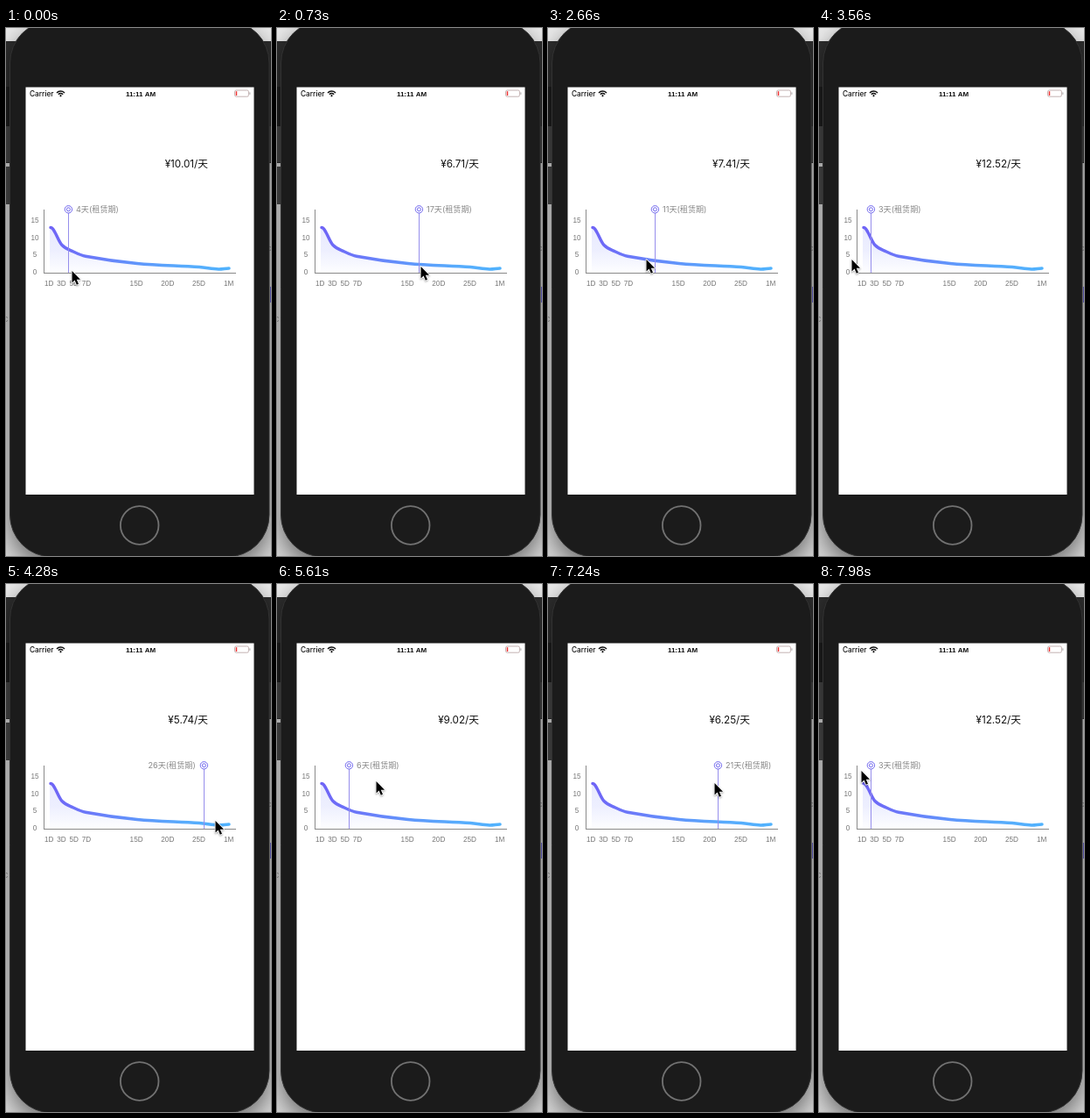
An HTML page with a canvas that plays this animation: 303x602 px, repeating every 8 s.

```html
<!DOCTYPE html>
<html lang="zh-CN">
<head>
<meta charset="utf-8">
<title>Rental price chart</title>
<style>
html, body { margin: 0; width: 100%; height: 100%; overflow: hidden; background: #c6c6c6; }
canvas { display: block; width: 303px; height: 602px; }
</style>
</head>
<body>
<canvas id="stage"></canvas>
<script>
const W = 303, H = 602, LOOP = 8000, STEP = 147.8;
const UI = 'Inter, "Noto Sans CJK SC", "Noto Sans CJK", sans-serif';
const SANS = '"Liberation Sans", Arial, sans-serif';
const canvas = document.getElementById('stage');
const dpr = window.devicePixelRatio || 1;
canvas.width = W * dpr;
canvas.height = H * dpr;
const ctx = canvas.getContext('2d');

// Eased sweeps of the marker and the hand: begin step, end step, goal
const MARKER = { from: [71], sweeps: [
  [0, 10, 253], [13, 21.36, 50], [23, 30.74, 252], [32, 36, 82],
  [38, 42, 221], [44, 46, 228], [47, 54, 59]] };
const HAND = { from: [75, 276], sweeps: [
  [0, 10, 252, 265], [13, 22.15, 6, 262], [22.2, 30.5, 261, 270], [32, 36, 84, 230],
  [37, 38, 113, 224], [38, 44, 225, 230], [47, 54, 48, 212]] };

// Known daily prices; days between them are interpolated
const PRICES = [[1, 15], [3, 12.52], [4, 10.01], [6, 9.02], [11, 7.41],
  [25, 5.78], [26, 5.74], [29, 5.57]];
const CURVE = [[51, 227.5], [64, 247.5], [77, 255], [91, 260.3],
  [150, 268.6], [221, 272.6], [243, 275], [255, 274]];

const clamp = k => Math.max(0, Math.min(1, k));
const smooth = k => k * k * (3 - 2 * k);

function follow({ from, sweeps }, step) {
  return sweeps.reduce((pos, [begin, end, ...goal]) => {
    const k = smooth(clamp((step - begin) / (end - begin)));
    return pos.map((v, i) => v + (goal[i] - v) * k);
  }, from).map(Math.round);
}

function priceOf(day) {
  const i = Math.max(1, PRICES.findIndex(p => p[0] >= day));
  const [d0, p0] = PRICES[i - 1], [d1, p1] = PRICES[i];
  return p0 + (p1 - p0) * clamp((day - d0) / (d1 - d0));
}

function rect(x, y, w, h, color) {
  ctx.fillStyle = color;
  ctx.fillRect(x, y, w, h);
}

function rounded(x, y, w, h, r) {
  ctx.beginPath();
  ctx.roundRect(x, y, w, h, r);
}

function stroke(color, width = 1) {
  ctx.strokeStyle = color;
  ctx.lineWidth = width;
  ctx.stroke();
}

function text(str, x, y, font, color, align = 'left') {
  ctx.font = font;
  ctx.fillStyle = color;
  ctx.textAlign = align;
  ctx.fillText(str, x, y);
}

function line(x1, y1, x2, y2, color) {
  ctx.beginPath();
  ctx.moveTo(x1, y1);
  ctx.lineTo(x2, y2);
  stroke(color);
}

function ring(x, y, r, color, width, fill = 'transparent') {
  ctx.beginPath();
  ctx.arc(x, y, r, 0, Math.PI * 2);
  ctx.fillStyle = fill;
  ctx.fill();
  stroke(color, width);
}

function gradient(x1, y1, x2, y2, ...colors) {
  const g = ctx.createLinearGradient(x1, y1, x2, y2);
  colors.forEach((c, i) => g.addColorStop(i / (colors.length - 1), c));
  return g;
}

function drawDesktop() {
  rect(0, 0, W, H, '#d6d6d6');
  rect(0, 0, W, 15, '#e9e9e9');
  rect(0, 15, W, 139, '#2d2d2d');
  rect(0, 67, 6, 46, '#1e1e1e');
  rect(0, 112, W, 41, '#454545');
  rect(0, 158, 6, 43, '#484848');
  text('C', -4, 335, '9px ' + SANS, '#888');
  text('c', 299, 254, '9px ' + SANS, '#888');
  rect(302, 295, 1, 18, '#6a68d0');
}

function drawPhone() {
  rounded(4.5, -8, 296.5, 611, 48);
  ctx.save();
  ctx.shadowColor = 'rgba(0,0,0,.5)';
  ctx.shadowBlur = 26 * dpr;
  ctx.shadowOffsetY = 10 * dpr;
  ctx.fillStyle = '#1b1b1b';
  ctx.fill();
  ctx.restore();
  stroke('#333');
  rect(22.5, 67.5, 261, 464.5, '#fff');
  ring(152.7, 567, 21.8, '#727272', 1.8);
}

function drawStatus() {
  text('Carrier', 27, 78, '500 8.3px ' + UI, '#111');
  text('11:11 AM', 154, 78, 'bold 8px ' + SANS, '#111', 'center');
  for (const r of [3.6, 6.2]) {
    ctx.beginPath();
    ctx.arc(62.5, 78.2, r, -Math.PI * 0.76, -Math.PI * 0.24);
    stroke('#111', 1.5);
  }
  ring(62.5, 77.2, 0.7, '#111', 1, '#111');
  rounded(261.5, 71, 16, 7.2, 1.8);
  stroke('#b5a0a0', 0.8);
  rect(262.7, 72.2, 1.5, 4.8, '#e33');
  rect(278.4, 73.4, 1, 2.4, '#aaa');
}

// Slope at a curve point, flat at both ends
function slope(i) {
  const a = CURVE[i - 1], b = CURVE[i + 1];
  return a && b ? (b[1] - a[1]) / (b[0] - a[0]) : 0;
}

function curvePath() {
  ctx.beginPath();
  ctx.moveTo(...CURVE[0]);
  for (let i = 1; i < CURVE.length; i++) {
    const [x0, y0] = CURVE[i - 1], [x1, y1] = CURVE[i];
    const d = (x1 - x0) / 3;
    ctx.bezierCurveTo(x0 + d, y0 + d * slope(i - 1), x1 - d, y1 - d * slope(i), x1, y1);
  }
}

function drawChart() {
  curvePath();
  ctx.lineTo(255, 277);
  ctx.lineTo(50, 277);
  ctx.lineTo(50, 228);
  ctx.fillStyle = gradient(0, 228, 0, 277, 'rgba(105,115,250,.15)', 'rgba(105,120,250,.12)', 'rgba(105,125,250,.02)');
  ctx.fill();

  line(43.5, 207, 43.5, 280, '#8a8a8a');
  line(43, 279.5, 263, 279.5, '#8a8a8a');
  const label = (str, x, y) => text(str, x, y, '8.2px ' + SANS, '#777', 'center');
  for (let v = 0; v <= 15; v += 5) label(v, 33, 281 - v * 3.94);
  for (const d of [1, 3, 5, 7, 15, 20, 25]) label(d + 'D', 42 + d * 7.14, 294);
  label('1M', 254.7, 294);

  curvePath();
  ctx.lineCap = 'round';
  stroke(gradient(51, 0, 255, 0, '#6f64f6', '#6a7cf9', '#5f97fb', '#57abfc', '#50b2fd'), 3.5);
  ctx.lineCap = 'butt';
}

function drawMarker(x) {
  const day = Math.floor(3.01 + (x - 59) * 0.1386);
  text('¥' + priceOf(day).toFixed(2) + '/天', 231, 159, '11.7px ' + UI, '#111', 'right');

  line(x + 0.5, 211, x + 0.5, 279, '#968eec');
  ring(x + 0.4, 206.8, 4.2, '#7168ee', 1, '#fff');
  ring(x + 0.4, 206.8, 2, '#7168ee', 1);
  const flip = x > 200;
  text(day + '天(租赁期)', flip ? x - 9.3 : x + 9, 210, '9.1px ' + UI, '#888', flip ? 'right' : 'left');
}

function drawHand(x, y) {
  ctx.save();
  ctx.translate(x + 0.5, y + 1);
  ctx.scale(0.9, 0.9);
  const arrow = new Path2D('M0 0V15L3.4 11.8L5.9 17.4L8.3 16.3L5.9 10.9H10.6Z');
  ctx.shadowColor = 'rgba(0,0,0,.35)';
  ctx.shadowBlur = 2 * dpr;
  ctx.shadowOffsetY = dpr;
  ctx.strokeStyle = '#fff';
  ctx.lineWidth = 1.8;
  ctx.lineJoin = 'round';
  ctx.stroke(arrow);
  ctx.shadowColor = 'transparent';
  ctx.fillStyle = '#000';
  ctx.fill(arrow);
  ctx.restore();
}

function draw(time) {
  const step = Math.floor((time % LOOP + 14) / STEP);
  ctx.setTransform(dpr, 0, 0, dpr, 0, 0);
  drawDesktop();
  drawPhone();
  drawStatus();
  drawChart();
  drawMarker(...follow(MARKER, step));
  drawHand(...follow(HAND, step));
}

const start = performance.now();
function tick() {
  draw(performance.now() - start);
  requestAnimationFrame(tick);
}
tick();
</script>
</body>
</html>
```
